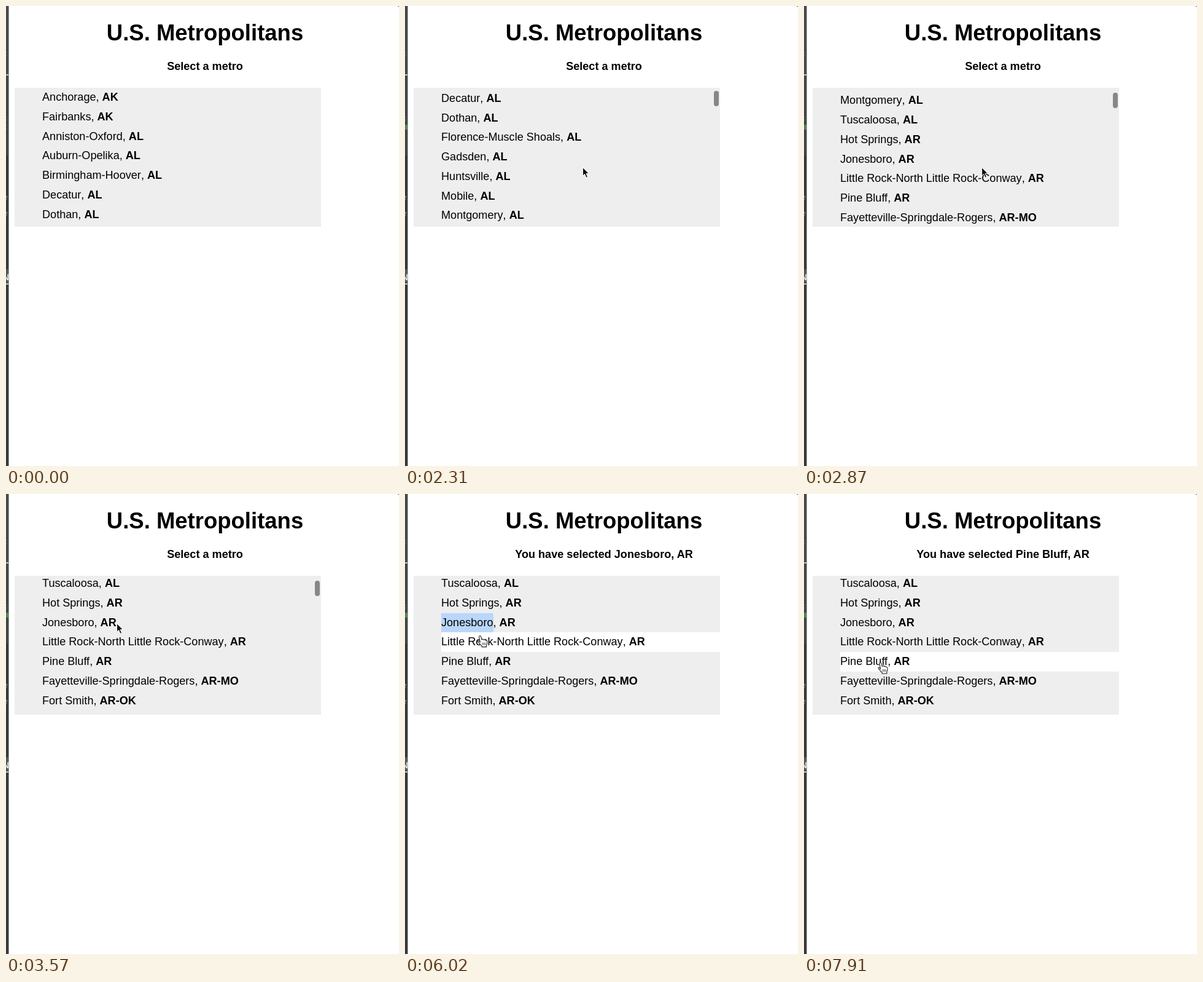
These frames come from a looping animation (640x748 px, 8 s). An HTML page with a canvas:

```html
<!DOCTYPE html>
<html lang="en">
<head>
<meta charset="utf-8">
<title>U.S. Metropolitans</title>
<style>
html, body { margin: 0; width: 100%; height: 100%; overflow: hidden; background: #fff; }
body { position: relative; font: 18.1px "Liberation Sans", Arial, Helvetica, sans-serif; color: #000; }
h1, #sub { position: absolute; left: 14px; width: 620px; margin: 0; text-align: center; font-weight: bold; white-space: nowrap; }
h1 { top: 23.5px; font-size: 36.5px; line-height: 40px; }
#sub { top: 88px; line-height: 20px; }
#box { position: absolute; left: 14px; top: 133px; width: 499px; height: 226px; background: #eee; overflow: hidden; }
#list { margin: 0; padding: 0 0 0 45px; list-style: none; }
#list li { height: 31.75px; line-height: 30px; white-space: pre; }
#list li.hover { background: #fff; }
#list span { display: inline-block; height: 31.75px; vertical-align: top; }
#list li.picked span { background: #b9d6fb; }
#list li.picked.hover span { background: #f5f9fe; color: #0b2158; }
#thumb { position: absolute; left: 488.5px; width: 8px; height: 25px; border-radius: 4px; background: #878787; }
#edge { position: absolute; left: 0; top: 0; width: 5px; height: 748px; }
#corner { position: absolute; right: 0; top: 0; width: 2px; height: 1px; background: #666; }
svg { position: absolute; left: 0; top: 0; overflow: visible; }
</style>
</head>
<body>
<canvas id="edge" width="5" height="748"></canvas>
<div id="corner"></div>
<h1>U.S. Metropolitans</h1>
<div id="sub"></div>
<div id="box"><ul id="list"></ul><div id="thumb"></div></div>
<svg id="arrow" width="12" height="19" viewBox="0 0 12 19">
  <path d="M.5 .5V14.2L3.6 11.3L6 17.2L8.5 16.1L6.1 10.4H10.4Z" fill="#111" stroke="#fff" stroke-width="1"/>
</svg>
<svg id="hand" width="18" height="20" viewBox="0 0 18 20">
  <path d="M4.6 11.6L2.9 3.2Q2.7 1.2 4.1 .9Q5.4 .7 5.9 2.4L7.2 7.3Q7.7 6 9 6.3Q10 6.5 10.2 7.6Q11 6.6 12.1 7Q13 7.3 13.2 8.4Q14.2 7.7 15.1 8.4Q16 9 16 10.4Q16.1 13.5 14.8 16V19H7.2V17.3Q4.5 15.5 3.4 13.2L1.2 10.8Q.5 9.7 1.4 9.1Q2.4 8.7 3.3 9.8Z" fill="#fff" stroke="#222" stroke-width="1.1" stroke-linejoin="round"/>
  <path d="M8.3 12V16M10.5 12V16M12.7 12V16" stroke="#333" stroke-width=".9"/>
</svg>
<script>
const LOOP = 8000, STEP = 70, ROW = 31.75;
const HOVER = 4970, PICK_A = 5110, PICK_B = 7490;
const metros = `Anchorage, AK
Fairbanks, AK
Anniston-Oxford, AL
Auburn-Opelika, AL
Birmingham-Hoover, AL
Decatur, AL
Dothan, AL
Florence-Muscle Shoals, AL
Gadsden, AL
Huntsville, AL
Mobile, AL
Montgomery, AL
Tuscaloosa, AL
Hot Springs, AR
Jonesboro, AR
Little Rock-North Little Rock-Conway, AR
Pine Bluff, AR
Fayetteville-Springdale-Rogers, AR-MO
Fort Smith, AR-OK`.split('\n');

// Each key is [time, values...]
const pointer = [
  [280, -12, 470], [840, 286, 309], [1820, 286, 309], [2170, 289, 262], [2870, 289, 262],
  [3500, 180, 210], [3850, 180, 210], [4480, 117, 207], [5740, 117, 207],
  [6440, 142, 277], [7070, 142, 277], [7350, 128, 275]
];
const scroll = [[2030, 0], [2590, 315], [3220, 384.3]];
const fade = [[3780, 1], [4130, 0]];

const $ = id => document.getElementById(id);
const list = $('list'), sub = $('sub'), thumb = $('thumb'), arrow = $('arrow'), hand = $('hand');
const ctx = $('edge').getContext('2d');

const rows = metros.map(name => {
  const [city, state] = name.split(', ');
  const li = document.createElement('li');
  li.innerHTML = `<span>${city}</span>, <b>${state}</b>`;
  list.append(li);
  return li;
});

function track(keys, t) {
  if (t <= keys[0][0]) return keys[0].slice(1);
  for (let i = 1; i < keys.length; i++) {
    const a = keys[i - 1], b = keys[i];
    if (t < b[0]) {
      const p = (t - a[0]) / (b[0] - a[0]), e = p * p * (3 - 2 * p);
      return a.slice(1).map((v, k) => v + (b[k + 1] - v) * e);
    }
  }
  return keys[keys.length - 1].slice(1);
}

// Sliver of the code editor behind the page
function drawEdge(active) {
  const rect = (color, y, h, x = 0, w = 4) => {
    ctx.fillStyle = color;
    ctx.fillRect(x, y, w, h);
  };
  const glyph = (char, y, color) => {
    ctx.fillStyle = color;
    ctx.fillText(char, -5, y);
  };
  ctx.clearRect(0, 0, 5, 748);
  rect('#38393b', 0, 748);
  rect('#48494b', 0, 112);
  rect('#c4c6c6', 111, 2);
  rect('#434547', 113, 130);
  rect('#a2a4a4', 0, 748, 4, 1);
  ctx.font = '14px "Liberation Sans", sans-serif';
  glyph('c', 82, '#6c6e70');
  glyph('c', 187, '#777');
  if (active) rect('#4f8a4c', 193, 8);
  else glyph('c', 201, '#6a6a6c');
  glyph('e', 316, '#8a8a8a');
  glyph('e', 342, '#8a8a8a');
  rect('#55595a', 428, 22);
  ctx.font = 'bold 14px "Liberation Sans", sans-serif';
  glyph('N', 446, '#dfe4e0');
  rect('#c9cccb', 451, 2);
}

function draw(t) {
  const [x, y] = track(pointer, t), [top] = track(scroll, t), [alpha] = track(fade, t);
  const over = t >= HOVER ? Math.floor((y - 133 + top) / ROW) : -1;
  const choice = t < PICK_A ? '' : metros[t < PICK_B ? 14 : 16];
  const label = choice ? 'You have selected ' + choice : 'Select a metro';
  if (sub.textContent !== label) sub.textContent = label;
  rows.forEach((li, i) => {
    li.classList.toggle('hover', i === over);
    li.classList.toggle('picked', i === 14 && t >= PICK_A && t < PICK_B);
  });
  list.style.transform = `translateY(${-top}px)`;
  thumb.style.top = 2 + top * 0.0165 + 'px';
  thumb.style.opacity = t > 2030 ? alpha : 0;
  const pointing = t >= HOVER;
  arrow.style.display = !pointing && t > 280 ? '' : 'none';
  hand.style.display = pointing ? '' : 'none';
  arrow.style.transform = `translate(${x}px, ${y}px)`;
  hand.style.transform = `translate(${x - 8}px, ${y - 2}px)`;
  drawEdge(t >= 420);
}

const start = performance.now();
function tick() {
  const t = (performance.now() - start) % LOOP;
  draw(Math.min(Math.floor(t / STEP) * STEP, 7910));
  requestAnimationFrame(tick);
}
draw(0);
tick();
</script>
</body>
</html>
```
